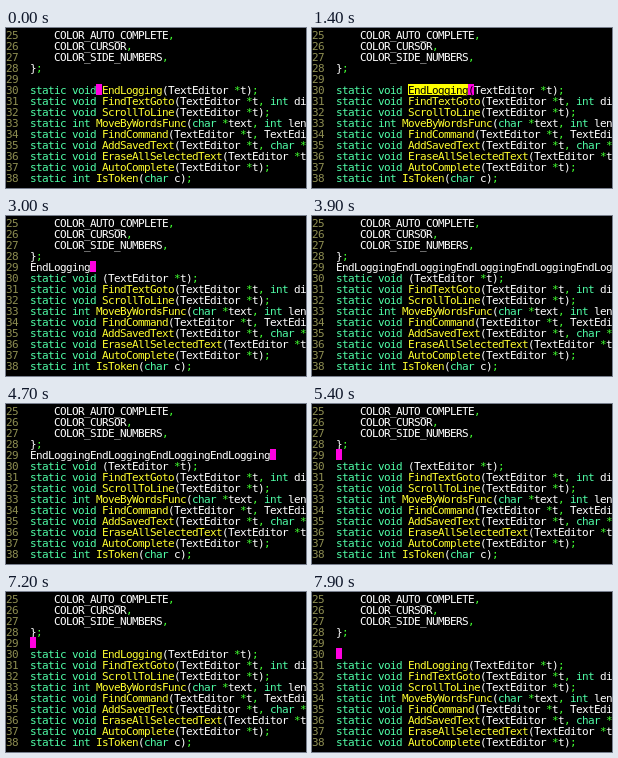
Recreate the animation shown at these times as an HTML page with a canvas. Size 300 by 160 pixels, loop 8 s.

```html
<!DOCTYPE html>
<html lang="en">
<head>
<meta charset="utf-8">
<title>Code editor</title>
<style>
html, body { margin: 0; width: 100%; height: 100%; overflow: hidden; background: #000; }
canvas { display: block; }
</style>
</head>
<body>
<canvas id="stage" width="300" height="160"></canvas>
<script>
const ctx = document.getElementById('stage').getContext('2d');
const CELL = 6, ROW = 11, LEFT = 24, TOP = 1, FIRST = 25, ROWS = 14, LOOP = 8000;
const WORD = 'EndLogging';
const COLORS = {
  number: '#8c8c50', keyword: '#50ffa8', func: '#ffff30', word: '#ffffff',
  operator: '#40ff30', cursor: '#ff00e0', select: '#ffff00'
};
const KEYWORDS = /^(static|void|int|char)$/;

const SOURCE = [
  '    COLOR_AUTO_COMPLETE,',
  '    COLOR_CURSOR,',
  '    COLOR_SIDE_NUMBERS,',
  '};',
  '',
  'static void EndLogging(TextEditor *t);',
  'static void FindTextGoto(TextEditor *t, int direction);',
  'static void ScrollToLine(TextEditor *t);',
  'static int MoveByWordsFunc(char *text, int length);',
  'static void FindCommand(TextEditor *t, TextEditor *c);',
  'static void AddSavedText(TextEditor *t, char *text);',
  'static void EraseAllSelectedText(TextEditor *t);',
  'static void AutoComplete(TextEditor *t);',
  'static int IsToken(char c);'
];

// Cursor moves: [time, line, column]
const MOVES = [
  [0, 30, 11], [300, 30, 12], [1900, 30, 12], [2300, 29, 0],
  [5700, 30, 22], [6000, 29, 0], [6300, 28, 0], [6800, 29, 0], [7500, 30, 0]
];

const clamp = (v, lo, hi) => Math.max(lo, Math.min(hi, v));

function stateAt(t) {
  const lines = SOURCE.slice();
  let [, line, col] = MOVES.filter(m => m[0] <= t).pop();
  let selected = 0, copies = 0;

  if (t >= 300 && t < 1900) {
    selected = clamp(Math.floor((t - 300) / 100), 0, WORD.length);
    col += selected;
  }
  if (t >= 1900 && t < 5700) lines[5] = lines[5].replace(WORD, '');
  if (t >= 2800 && t < 4600) {
    copies = t < 3100 ? 1 : Math.min(6, 2 + Math.floor((t - 3100) / 200));
  } else if (t >= 4600 && t < 5200) {
    copies = 5 - Math.floor((t - 4600) / 100);
  }
  if (copies) {
    lines[4] = WORD.repeat(copies);
    col = lines[4].length;
  }
  if (t >= 7500) lines.splice(4, 0, '');
  return { lines, line, col, selected };
}

function colorOf(token, next) {
  if (KEYWORDS.test(token)) return COLORS.keyword;
  if (/[*,;]/.test(token)) return COLORS.operator;
  return next === '(' ? COLORS.func : COLORS.word;
}

function drawText(text, col, row, color) {
  ctx.fillStyle = color;
  ctx.fillText(text, LEFT + col * CELL, TOP + row * ROW + 10);
}

function drawBlock(col, row, count, color, text) {
  ctx.fillStyle = color;
  ctx.fillRect(LEFT + col * CELL, TOP + row * ROW, count * CELL, ROW);
  drawText(text.slice(col, col + count), col, row, '#000');
}

function draw(t) {
  const { lines, line, col, selected } = stateAt(t);
  ctx.fillStyle = '#000';
  ctx.fillRect(0, 0, 300, 160);
  ctx.font = '11px "DejaVu Sans Mono", monospace';
  ctx.letterSpacing = '0px';
  // Tighten the advance to the editor's cell grid
  ctx.letterSpacing = CELL - ctx.measureText('0').width + 'px';
  for (let row = 0; row < ROWS; row++) {
    const text = lines[row];
    drawText(String(FIRST + row), -4, row, COLORS.number);
    for (const m of text.matchAll(/\w+|\S/g)) {
      drawText(m[0], m.index, row, colorOf(m[0], text[m.index + m[0].length]));
    }
  }
  const row = line - FIRST;
  if (selected) drawBlock(col - selected, row, selected, COLORS.select, lines[row]);
  drawBlock(col, row, 1, COLORS.cursor, lines[row]);
}

const start = performance.now();
function frame() {
  const t = (performance.now() - start) % LOOP;
  draw(Math.floor(t / 100) * 100);
  requestAnimationFrame(frame);
}
frame();
</script>
</body>
</html>
```
